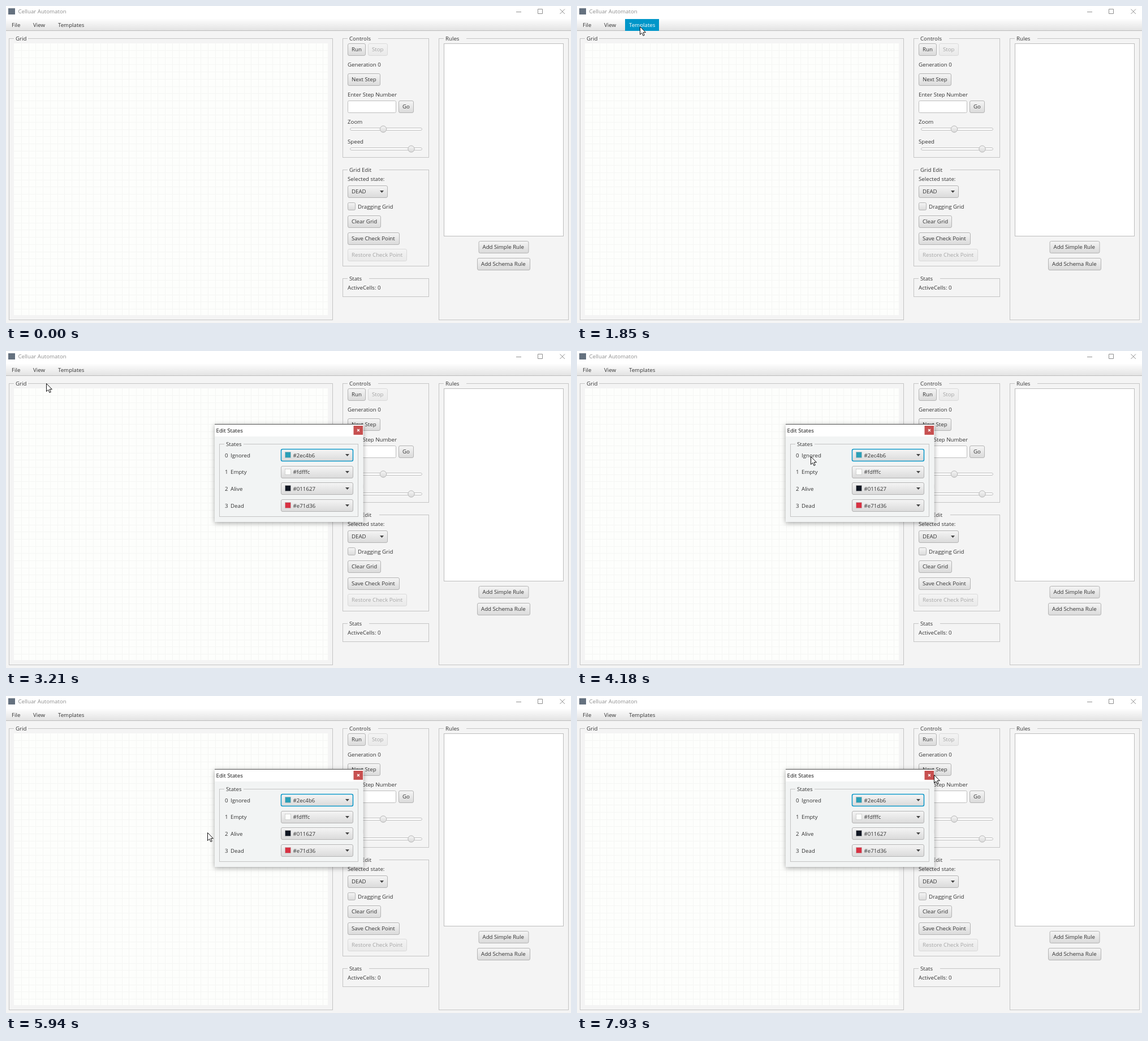
Animation of 999x560 px, one loop 8 s. Source, as an HTML page:

```html
<!DOCTYPE html>
<html lang="en">
<head>
<meta charset="utf-8">
<title>Celluar Automaton</title>
<style>
html, body { margin: 0; width: 100%; height: 100%; overflow: hidden; background: #f4f4f4; }
svg { display: block; width: 999px; height: 560px; }
text { font: 9.7px "Open Sans", "Noto Sans", sans-serif; fill: #333; white-space: pre; }
.group { fill: none; stroke: #c4c4c4; }
.button { fill: url(#face); stroke: #b4b4b4; }
.field { fill: #fff; stroke: #bdbdbd; }
.off { opacity: .4; }
.focus { fill: none; stroke: #139bcb; stroke-width: 1.6; }
.hot { fill: #0096c9; }
.white { fill: #fff; }
</style>
</head>
<body>
<svg id="stage" viewBox="0 0 999 560"></svg>
<script>
const LOOP = 8000;
const stage = document.getElementById('stage');

// Drawing helpers; text is placed by the middle of its line.
const text = (x, y, s, attr = '') => `<text x="${x}" y="${y + 3.5}" ${attr}>${s}</text>`;
const box = (x, y, w, h, attr) => `<rect x="${x}" y="${y}" width="${w}" height="${h}" ${attr}/>`;
const edge = (x, y, w, h, cls, r = 0) =>
  box(x + .5, y + .5, w - 1, h - 1, `rx="${r}" class="${cls}"`);
const group = (x, y, w, h, title, gap, bg = '#f4f4f4') =>
  edge(x, y, w, h, 'group') + box(x + 9, y - 1, gap, 3, `fill="${bg}"`) + text(x + 12, y, title);
const button = (x, y, w, label, off) =>
  `<g class="${off ? 'off' : ''}">${edge(x, y, w, 22, 'button', 2.5)}${text(x + 7, y + 10.8, label)}</g>`;
const arrow = (x, y) => `<path d="M${x - 3.5} ${y - 2}h7l-3.5 4z" fill="#444"/>`;
const slider = (y, x) =>
  edge(608, y - 2, 128, 5, 'field', 2.5) +
  `<circle cx="${x}" cy="${y + .5}" r="5.7" class="button"/>`;

function gridLines() {
  let d = '';
  for (let x = 27; x < 569; x += 12.7) d += `M${Math.round(x) + .5} 66v480`;
  for (let y = 78; y < 546; y += 12.7) d += `M14 ${Math.round(y) + .5}h555`;
  return `<path d="${d}" stroke="#f5f6f4"/>`;
}

const frameArt = () =>
  box(0, 0, 999, 560, 'fill="#f4f4f4"') +
  box(0, 0, 999, 23, 'fill="#fff"') +
  box(4, 4, 12, 11, 'fill="#65717f"') +
  `<g id="caption">${text(21.5, 9.5, 'Celluar Automaton', 'style="fill:inherit"')}
   <path d="M902 10.5h9M940.5 5.5h8v8h-8zM979.5 5.5l8.5 8.5m0-8.5l-8.5 8.5" fill="none"/></g>` +
  box(0, 23, 999, 21, 'fill="url(#bar)"') + box(0, 43, 999, 1, 'fill="#bcbcbc"') +
  box(41, 23, 36, 21, 'id="viewHot" class="hot"') +
  box(85, 23, 60, 21, 'id="templatesHot" class="hot"') +
  text(10, 33.5, 'File') + text(48, 33.5, 'View', 'id="viewText"') +
  text(92, 33.5, 'Templates', 'id="templatesText"');

const panels = () =>
  group(5, 57, 573, 498, 'Grid', 25) +
  box(14, 66, 555, 480, 'fill="#fdfefc"') + gridLines() +
  group(595, 57, 153, 211, 'Controls', 54) +
  button(604, 66, 32, 'Run') + button(640, 66, 35, 'Stop', true) +
  text(604, 103.5, 'Generation 0') + button(604, 119, 58, 'Next Step') +
  text(604, 156, 'Enter Step Number') + edge(604, 167, 86, 22, 'field', 2) +
  button(694, 167, 27, 'Go') +
  text(604, 204.5, 'Zoom') + slider(217, 667) +
  text(604, 239.5, 'Speed') + slider(252, 716.5) +
  group(595, 289, 153, 171, 'Grid Edit', 56) +
  text(604, 305.5, 'Selected state:') + button(604, 317, 71, 'DEAD') + arrow(664.5, 328) +
  edge(604, 347, 14, 14, 'button', 2) + text(622, 354, 'Dragging Grid') +
  button(604, 370, 59, 'Clear Grid') +
  box(604.5, 370.5, 58, 21, 'rx="2.5" id="clearFocus" class="focus"') +
  button(604, 400, 92, 'Save Check Point') + button(604, 429, 105, 'Restore Check Point', true) +
  group(595, 481, 153, 33, 'Stats', 38) + text(604, 497.5, 'ActiveCells: 0') +
  group(765, 57, 230, 498, 'Rules', 40) + edge(774, 66, 212, 341, 'field') +
  button(835.5, 415, 89, 'Add Simple Rule') + button(833, 445, 94, 'Add Schema Rule');

const menu = () => `<g id="menu">
  ${box(41, 44, 134, 50, 'fill="#fcfcfc" stroke="#c8c8c8" stroke-width=".6" filter="url(#shadow)"')}
  ${box(41, 48, 134, 21, 'id="editHot" class="hot"')}
  ${text(46, 58.5, 'Edit States', 'id="editText"')}${text(46, 79.5, 'Show Grid View Fullscreen')}</g>`;

const states = [['Ignored', '#2ec4b6', '#2a9fb7'], ['Empty', '#fdfffc', '#fdfffc'],
                ['Alive', '#011627', '#101622'], ['Dead', '#e71d36', '#d83142']];

const dialog = () => `<g id="dialog">
  ${box(369, 129, 262.5, 173, 'fill="#f2f4f4" filter="url(#shadow)"')}
  ${box(369, 129, 262.5, 22, 'fill="#fff"')}${box(369, 129, 262.5, 1, 'fill="#555"')}
  ${text(371.5, 140, 'Edit States', 'style="fill:#111"')}
  ${box(614.5, 132, 16.5, 16, 'fill="#c75050"')}
  <path d="M621 138l4 4m0-4l-4 4" stroke="#fff" stroke-width="1.3"/>
  ${group(377, 164, 246, 129, 'States', 34, '#f2f4f4')}
  ${states.map(([name, code, color], i) => {
    const y = 184 + 29.7 * i, top = Math.round(y) - 11;
    return text(387, y, i) + text(397, y, name) + edge(486, top, 128, 22, 'button', 2.5) +
      box(493.5, top + 5.5, 10, 10, `fill="${color}" stroke="#bbb" stroke-width=".6"`) +
      text(507.5, y, code) + arrow(603.5, top + 11);
  }).join('')}
  ${box(486.5, 173.5, 127, 21, 'rx="2.5" class="focus"')}</g>`;

const gradient = (id, a, b) => `<linearGradient id="${id}" x2="0" y2="1">
  <stop stop-color="${a}"/><stop offset="1" stop-color="${b}"/></linearGradient>`;

stage.innerHTML = `<defs>${gradient('face', '#f5f5f5', '#dadada')}${gradient('bar', '#fdfdfd', '#e2e2e2')}
  <filter id="shadow" x="-20%" y="-20%" width="140%" height="150%">
  <feDropShadow dx="0" dy="2" stdDeviation="4" flood-opacity=".35"/></filter></defs>` +
  frameArt() + panels() + menu() + dialog() +
  `<path id="cursor" d="M.5 .5V14.5L3.7 11.5 6 16.5 8.2 15.5 6 10.7H10.4Z" fill="#fff" stroke="#111"/>`;

const el = {};
stage.querySelectorAll('[id]').forEach(node => el[node.id] = node);
const show = (node, on) => node.style.display = on ? '' : 'none';
const mark = (name, on) => {
  show(el[name + 'Hot'], on);
  el[name + 'Text'].classList.toggle('white', on);
};

// Pointer stops: time, x, y
const path = [
  [390, 957, 543], [1160, 324, 175], [1230, 290, 146], [1580, 118, 42], [1650, 111, 36],
  [1850, 111, 36], [2260, 60, 36], [2530, 60, 36], [2730, 65, 49], [2800, 64, 49],
  [3059, 64, 49], [3060, 71, 48], [3209, 71, 48], [3210, 71, 57], [3970, 384, 176],
  [4180, 413, 186], [4310, 414, 184], [4450, 414, 184], [4650, 383, 183], [5100, 600, 184],
  [5310, 592, 211], [5400, 580, 214], [5940, 355, 241], [6140, 472, 254], [6210, 474, 258],
  [6600, 372, 270], [6960, 416, 288], [7170, 537, 288], [7300, 537, 288], [7700, 671, 210],
  [7930, 631, 139], [8000, 631, 139]
];

function pointer(t) {
  const i = path.findIndex(p => p[0] > t);
  const [t0, x0, y0] = path[i - 1], [t1, x1, y1] = path[i];
  const k = (t - t0) / (t1 - t0);
  return [Math.round(x0 + (x1 - x0) * k), Math.round(y0 + (y1 - y0) * k)];
}

function draw(t) {
  const active = t >= 2460 && t < 3210;
  const moving = t >= 390;
  const [x, y] = moving ? pointer(t) : [0, 99];
  const onBar = y < 44 && t < 2460;
  show(el.cursor, moving);
  el.cursor.setAttribute('transform', `translate(${x} ${y})`);
  mark('view', active || onBar && x >= 41 && x < 77);
  mark('templates', onBar && x >= 85 && x < 145);
  mark('edit', active && t >= 2800);
  show(el.menu, active);
  show(el.clearFocus, active);
  show(el.dialog, t >= 3210);
  const ink = active ? '#000' : '#8e8e8e';
  el.caption.setAttribute('fill', ink);
  el.caption.setAttribute('stroke', 'none');
  el.caption.lastElementChild.setAttribute('stroke', ink);
}

const start = performance.now();
function tick() {
  draw((performance.now() - start) % LOOP);
  requestAnimationFrame(tick);
}
tick();
</script>
</body>
</html>
```
